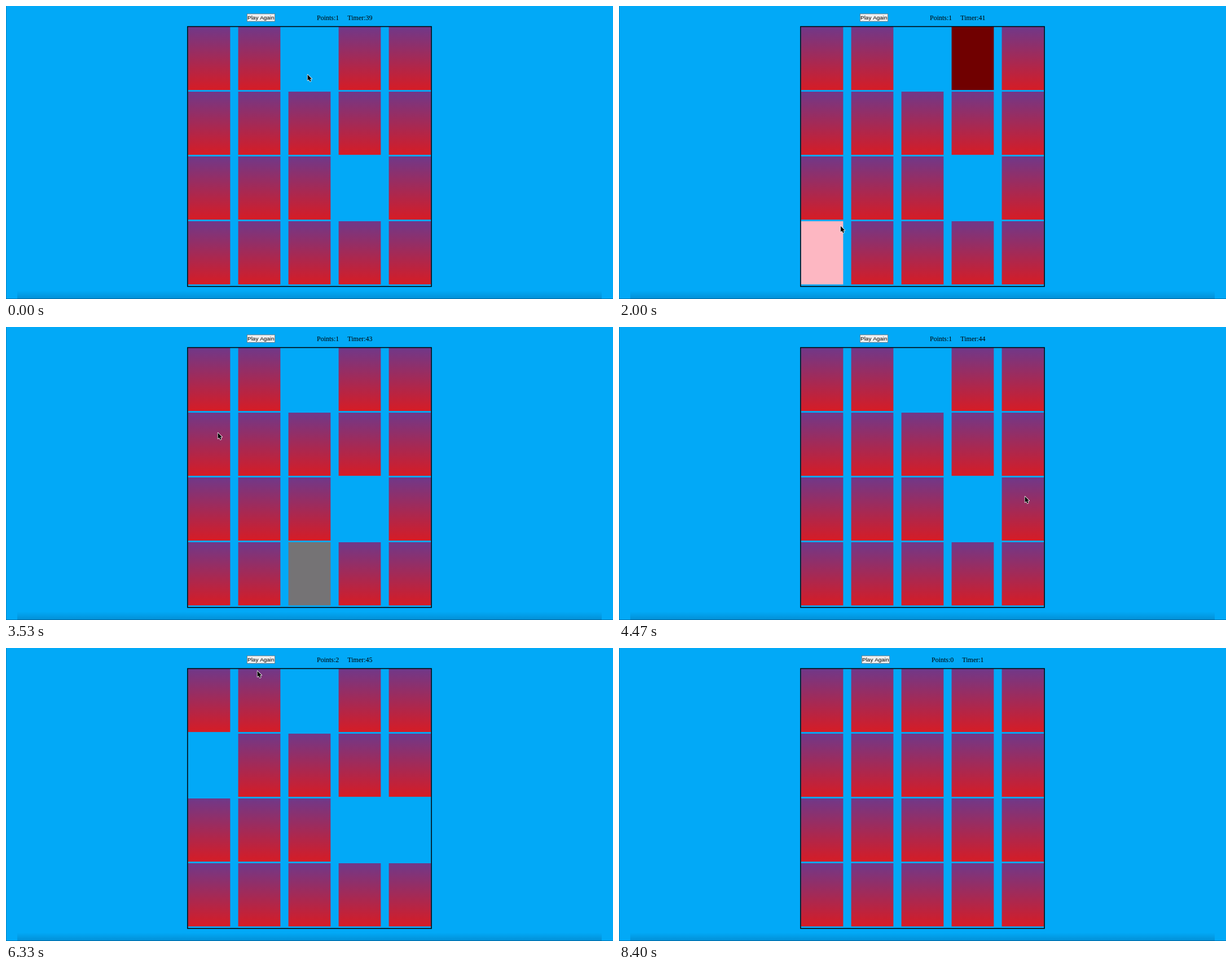
Recreate the animation shown at these times as an HTML page with a canvas. Size 1076 by 520 pixels, loop 8990 ms.

```html
<!DOCTYPE html>
<html lang="en">
<head>
<meta charset="utf-8">
<title>Memory game</title>
<style>
  html, body { margin: 0; width: 100%; height: 100%; overflow: hidden; background: #02a9f7; }
  canvas { display: block; }
</style>
</head>
<body>
<canvas id="stage" width="1076" height="520"></canvas>
<script>
const ctx = document.getElementById('stage').getContext('2d');
const LOOP = 8990, STEP = 200 / 3;
const RESET = 7000, CURSOR_HIDDEN = 8395;
const CARD = { left: 322.6, top: 37, dx: 89, dy: 115, w: 74.8, h: 112.1 };

// Face-up cards: row, column, colour, shown from, shown until
const flips = [
  [0, 3, '#700000', 730, 2170],
  [3, 0, '#fdb7c2', 1665, 2170],
  [3, 2, '#757375', 2665, 4170],
  [1, 0, '#0000ff', 3665, 4170],
  [2, 4, '#0000ff', 4730, 6170],
  [1, 0, '#0000ff', 5665, 6170]
];

// Matched cards: row, column, removed at
const matched = [[0, 2, 0], [2, 3, 0], [1, 0, 6170], [2, 4, 6170]];

// Pointer stops: time, x, y
const stops = [
  [0, 534, 121], [200, 534, 121], [533, 613, 126], [800, 613, 126],
  [1600, 387, 388], [1933, 387, 388], [2533, 540, 440], [2867, 540, 440],
  [3533, 375, 187], [3800, 375, 187], [4467, 719, 300], [4867, 719, 300],
  [5533, 376, 196], [5800, 376, 196], [6333, 445, 40], [6733, 448, 22],
  [LOOP, 448, 22]
];

function rect(x, y, w, h, fill) {
  ctx.fillStyle = fill;
  ctx.fillRect(x, y, w, h);
}

function text(value, x, y, font) {
  ctx.font = font;
  ctx.fillStyle = '#000';
  ctx.fillText(value, x, y);
}

function pointerAt(t) {
  const i = Math.max(1, stops.findIndex(stop => stop[0] >= t));
  const [t0, x0, y0] = stops[i - 1], [t1, x1, y1] = stops[i];
  const u = (t - t0) / (t1 - t0), ease = u * u * (3 - 2 * u);
  return [x0 + (x1 - x0) * ease, y0 + (y1 - y0) * ease];
}

function drawBackground() {
  rect(0, 0, 1076, 520, '#02a9f7');
  const shade = ctx.createLinearGradient(0, 505, 0, 520);
  shade.addColorStop(0, 'rgba(0,40,80,0)');
  shade.addColorStop(1, 'rgba(0,40,80,.2)');
  rect(20, 505, 1036, 15, shade);
  rect(0, 0, 1, 520, 'rgba(0,50,90,.3)');
  rect(0, 519, 1076, 1, 'rgba(0,40,80,.4)');
}

function drawHeader(t, hover) {
  const fresh = t >= RESET, shift = fresh ? 3 : 0;
  const points = fresh ? 0 : t >= 5665 ? 2 : 1;
  const timer = fresh ? +(t >= 7995) : 39 + Math.floor((t + 600) / 1000);
  const pressed = t >= 6925 && t < RESET;
  rect(427 + shift, 13.5, 50, 14.2, hover ? '#4f4f4f' : '#6b6f72');
  rect(427.8 + shift, 14.3, 48.4, 12.6, pressed ? '#f5f5f5' : hover ? '#e5e5e5' : '#efefef');
  text('Play Again', 428 + shift, 24, '9.96px "Liberation Sans", Arial, sans-serif');
  const serif = '12px "Liberation Serif", Times, serif';
  text('Points:' + points, 551 + shift, 24.5, serif);
  text('Timer:' + timer, 605.3 + shift, 24.5, serif);
}

function drawBoard(t) {
  for (let row = 0; row < 4; row++) {
    for (let col = 0; col < 5; col++) {
      const here = item => item[0] === row && item[1] === col;
      if (t < RESET && matched.some(m => here(m) && t >= m[2])) continue;
      const x = CARD.left + col * CARD.dx, y = CARD.top + row * CARD.dy;
      const face = flips.find(f => here(f) && t >= f[3] && t < f[4]);
      const back = ctx.createLinearGradient(0, y, 0, y + CARD.h);
      back.addColorStop(0, '#703889');
      back.addColorStop(1, '#d61c25');
      rect(x, y, CARD.w, CARD.h, face ? face[2] : back);
    }
  }
  ctx.strokeStyle = '#000';
  ctx.lineWidth = 1.5;
  ctx.strokeRect(321.85, 36.5, 432.3, 461.2);
}

function drawPointer(x, y) {
  ctx.save();
  ctx.translate(x, y);
  const arrow = new Path2D('M.6 .8V11.3L3 9.2L4.8 13L6.7 12.2L5 8.4H8.2Z');
  ctx.lineWidth = 1.5;
  ctx.lineJoin = 'round';
  ctx.strokeStyle = '#fff';
  ctx.stroke(arrow);
  ctx.fillStyle = '#000';
  ctx.fill(arrow);
  ctx.restore();
}

function draw(now) {
  const t = Math.floor((now % LOOP + 5) / STEP) * STEP;
  const [x, y] = pointerAt(t);
  const visible = t < CURSOR_HIDDEN;
  drawBackground();
  drawHeader(t, visible && y < 28);
  drawBoard(t);
  if (visible) drawPointer(x, y);
}

const start = performance.now();
function tick() {
  draw(performance.now() - start);
  requestAnimationFrame(tick);
}
tick();
</script>
</body>
</html>
```
